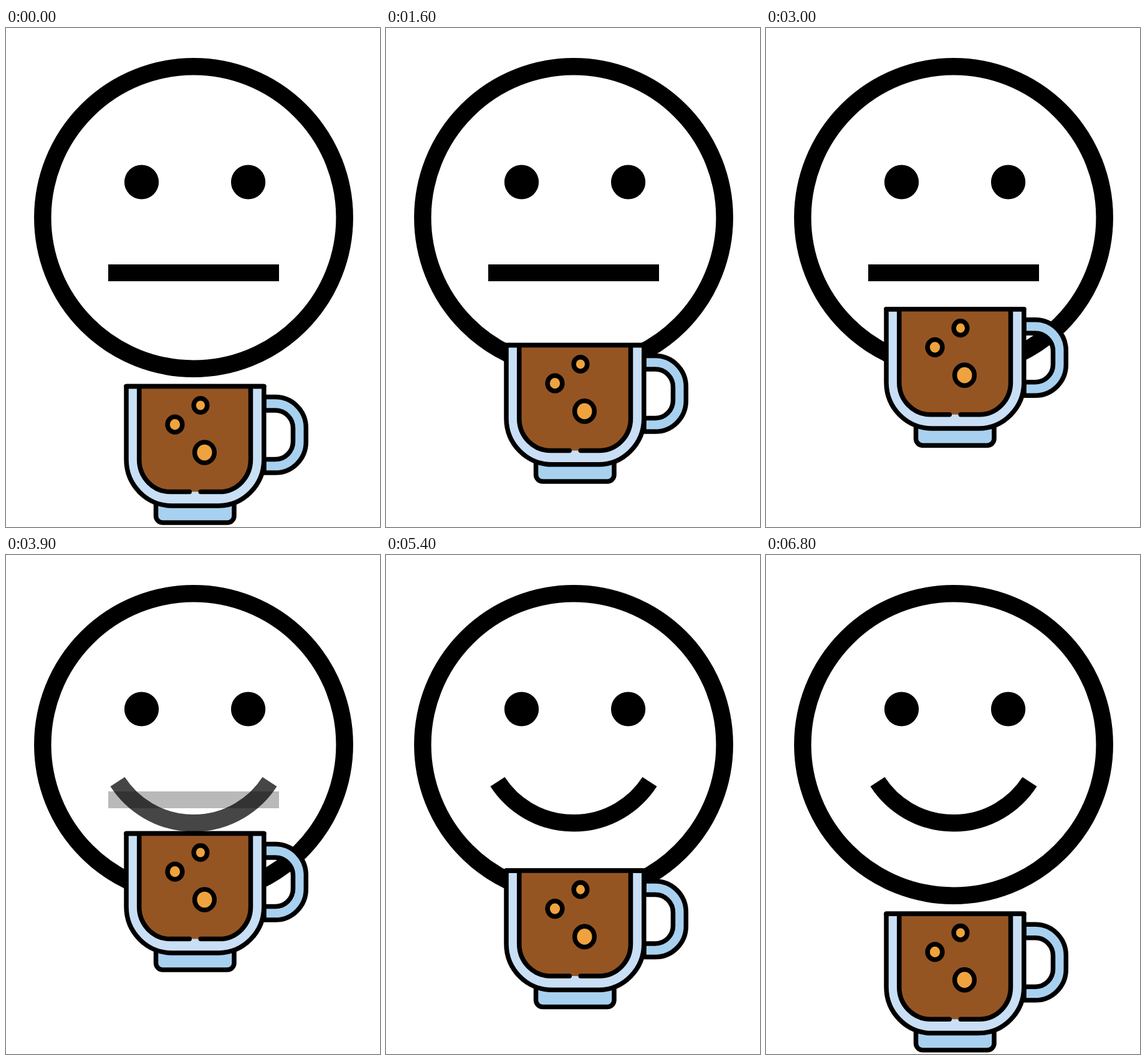
Animation of 600x800 px, one loop 8000 ms. Source, as an HTML page:

```html
<!DOCTYPE html>
<html lang="en">
<head>
<meta charset="utf-8">
<title>Coffee smile</title>
<style>
  html, body { margin: 0; width: 100%; height: 100%; overflow: hidden; background: #fff; }
  svg { display: block; width: 100%; height: 100%; }
  #cup { stroke: #000; stroke-width: 7.5; stroke-linecap: round; stroke-linejoin: round; }
  .line { fill: none; }
  .pale { fill: #c9dff5; }
  .blue { fill: #a8d1f0; }
  .coffee { fill: #955523; stroke: none; }
  .bubble { fill: #efa33e; }
</style>
</head>
<body>
<svg viewBox="0 0 600 800">
  <g id="face">
    <circle cx="301" cy="304" r="242.2" fill="none" stroke="#000" stroke-width="27.5"/>
    <circle cx="217.5" cy="247" r="27.6"/>
    <circle cx="388.6" cy="247" r="27.6"/>
    <rect id="flat" x="164" y="379" width="274" height="27"/>
    <path id="smile" d="M179 363.5A145.4 145.4 0 0 0 423 363.5" fill="none" stroke="#000" stroke-width="27.5"/>
  </g>
  <!-- Cup geometry is relative to the top edge of its rim -->
  <g id="cup">
    <path class="blue" d="M414 21H432A49.3 49.5 0 0 1 481.3 70.5V93A49.3 49.5 0 0 1 432 142.5H414V121H432A28.5 28.5 0 0 0 460.5 92.5V71A28.5 28.5 0 0 0 432 42.5H414Z"/>
    <path class="blue" d="M240.5 190V211.5A11 11 0 0 0 251.5 222.5H355A11 11 0 0 0 366 211.5V190Z"/>
    <path class="pale" d="M193 3.9V121.5A73 74 0 0 0 266 195.3H341A73 74 0 0 0 413.8 121.5V3.9Z"/>
    <path class="coffee" d="M213.7 3.9V121.5A50 51.5 0 0 0 263.7 173H342.5A50 51.5 0 0 0 392.5 121.5V3.9Z"/>
    <path class="line" d="M213.7 3.9V121.5A50 51.5 0 0 0 263.7 173H294.3M312.3 173H342.5A50 51.5 0 0 0 392.5 121.5V3.9M193 3.9H413.8"/>
    <ellipse class="bubble" cx="312" cy="34.4" rx="10.8" ry="11.3"/>
    <ellipse class="bubble" cx="271" cy="65.1" rx="11.9" ry="12.4"/>
    <ellipse class="bubble" cx="318.5" cy="109.9" rx="15.8" ry="16.6"/>
  </g>
</svg>
<script>
  const LOOP = 8000, STEP = 100, LAST = 6800;
  const RISE_END = 3100, FALL_START = 4200;
  const TOP = 442.6, LOW = 570.6, FALL_SPEED = 0.0495;
  const [flat, smile, cup] = ['flat', 'smile', 'cup'].map(id => document.getElementById(id));
  const clamp = v => Math.min(1, Math.max(0, v));

  function cupY(t) {
    if (t < RISE_END) return LOW + (TOP - LOW) * t / RISE_END;
    return TOP + FALL_SPEED * Math.max(0, t - FALL_START);
  }

  function draw(now) {
    // The motion advances ten times a second, then rests
    const t = Math.min(LAST, Math.floor(now % LOOP / STEP) * STEP);
    const joy = clamp((t - RISE_END) / (FALL_START - RISE_END));
    smile.setAttribute('opacity', joy);
    flat.setAttribute('opacity', 1 - joy);
    cup.setAttribute('transform', `translate(0 ${cupY(t)})`);
  }

  function tick() {
    draw(performance.now());
    requestAnimationFrame(tick);
  }
  tick();
</script>
</body>
</html>
```
